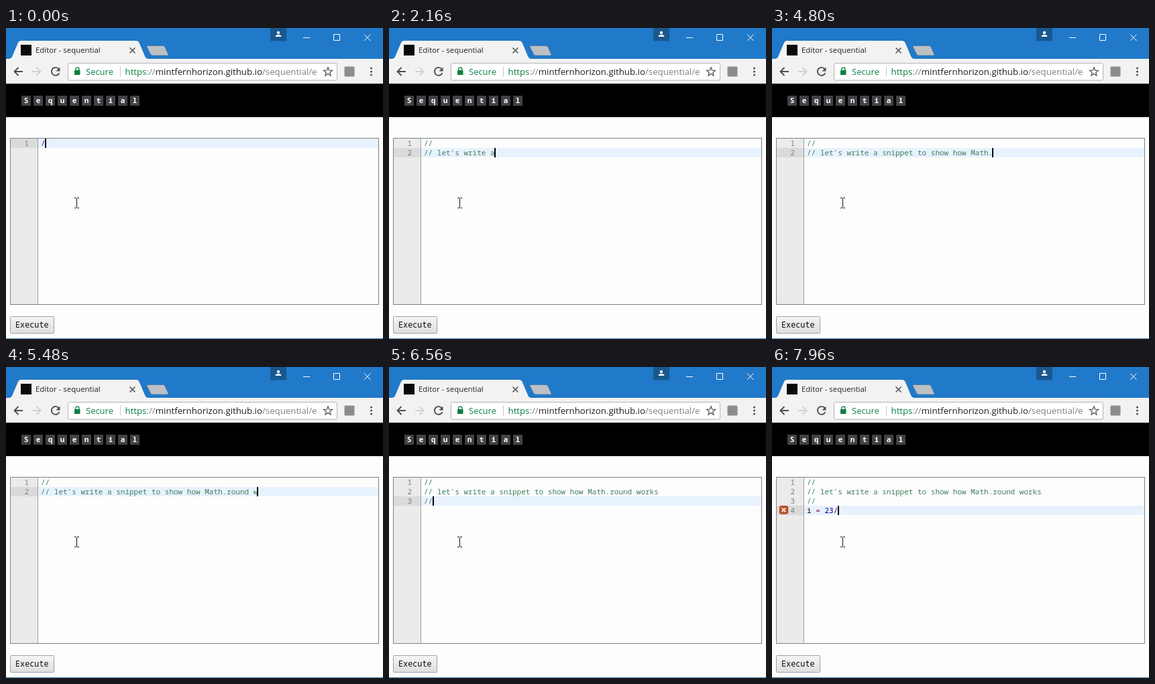
An HTML page that plays this animation: 562 px wide and 464 px high, repeating every 8000 ms.

```html
<!DOCTYPE html>
<html lang="en">
<head>
<meta charset="utf-8">
<title>Editor - sequential</title>
<style>
  html, body { margin: 0; width: 100%; height: 100%; overflow: hidden; background: #fdfdfd; }
  svg { display: block; width: 562px; height: 464px; }
  text { white-space: pre; }
  .ui { font-family: "Open Sans", "Noto Sans", sans-serif; }
  .mono { font-family: "Noto Sans Mono", "DejaVu Sans Mono", monospace; }
  .code { font-size: 11px; }
  .num { text-anchor: end; fill: #7c7c7c; }
  .comment { fill: #3f7f5f; }
  .operator { fill: #7f0055; }
  .regexp { fill: #2a00ff; }
  .number { fill: #00008b; }
  .plain { fill: #000; }
</style>
</head>
<body>
<svg viewBox="0 0 562 464">
  <defs>
    <linearGradient id="face" x2="0" y2="1">
      <stop stop-color="#f5f5f5"/><stop offset="1" stop-color="#dedede"/>
    </linearGradient>
  </defs>
  <rect width="562" height="464" fill="#fdfdfd"/>

  <!-- window frame and tab -->
  <rect width="562" height="46" fill="#2179c9"/>
  <path d="M211 26.500h23q2 0 3 2l5 11q.5 1.500-1.500 1.500h-22q-2 0-3-2l-5.500-11q-.5-1.500 1-1.500z" fill="#bcc0c4" stroke="#3f719f" stroke-width=".7"/>
  <path d="M4 46q4 0 5.500-4l8-19q1.500-4 5-4h171q4 0 5.500 4l8 19q1.500 4 5.500 4z" fill="#f2f2f2"/>
  <rect y="46" width="562" height="37" fill="#f2f2f2"/>
  <rect x="22" y="25" width="16" height="16" fill="#0a0a0a"/>
  <text class="ui" x="44" y="37" font-size="11.4" fill="#222">Editor - sequential</text>
  <path d="M184.500 29.500l8 8m0-8l-8 8" stroke="#555" stroke-width="1.600"/>
  <rect x="394" width="24" height="19.500" fill="#19588f"/>
  <circle cx="406" cy="7" r="2.200" fill="#fff"/>
  <path d="M401.500 13q0-3 4.500-3t4.500 3z" fill="#fff"/>
  <path d="M443 14.500h10M488.500 9.500h9v9h-9zM534 9.500l9.500 9.500m0-9.500l-9.500 9.500" fill="none" stroke="#fff"/>

  <!-- toolbar -->
  <g fill="none" stroke="#4d4d4d" stroke-width="1.900">
    <path d="M25 65H12.500m6-6l-6 6 6 6"/>
    <path d="M39 65h12.500m-6-6l6 6-6 6" stroke="#d2d2d2"/>
    <path d="M78.500 61a6 6 0 1 0 1 6"/>
  </g>
  <path d="M80.500 58.500v6h-6z" fill="#4d4d4d"/>
  <rect x="92.500" y="52.500" width="401" height="25.500" rx="2" fill="#fff" stroke="#b4b4b4"/>
  <rect x="102" y="63" width="8.500" height="7" rx=".7" fill="#0b8043"/>
  <path d="M103.700 63.500v-2a2.600 2.600 0 0 1 5.200 0v2" fill="none" stroke="#0b8043" stroke-width="1.400"/>
  <text class="ui" x="119" y="70" font-size="13" fill="#0b8043">Secure</text>
  <path d="M170.500 57.500v15" stroke="#c8c8c8"/>
  <text class="ui" x="177.500" y="70" font-size="13.25" fill="#808080"><tspan fill="#0b8043">https</tspan>://<tspan fill="#1c1c1c">mintfernhorizon.github.io</tspan>/sequential/e</text>
  <path id="star" fill="none" stroke="#5a5a5a" stroke-width="1.300"/>
  <rect x="504.500" y="57.500" width="15" height="15" rx="1.500" fill="#8c8c8c"/>
  <g fill="#4d4d4d">
    <circle cx="544.500" cy="60" r="1.500"/><circle cx="544.500" cy="65" r="1.500"/><circle cx="544.500" cy="70" r="1.500"/>
  </g>

  <!-- page -->
  <rect y="83" width="562" height="50" fill="#000"/>
  <g id="heading" class="mono" font-size="11" font-weight="700" text-anchor="middle" fill="#fff"></g>

  <rect x="7" y="165" width="40" height="248" fill="#ebebeb"/>
  <g id="activeLine">
    <rect x="7" y="165" width="40" height="14" fill="#dadada"/>
    <rect x="48" y="165" width="507" height="14" fill="#e8f2fe"/>
  </g>
  <path d="M47.500 165v248" stroke="#9f9f9f"/>
  <g id="error">
    <rect x="11.500" y="207.500" width="12" height="11.500" rx="2" fill="#cf4f28" stroke="#943a20"/>
    <path d="M14.700 210.500l5.600 5.600m0-5.600l-5.600 5.600" stroke="#fff" stroke-width="1.600"/>
  </g>
  <g id="code" class="mono code"></g>
  <rect id="caret" width="2" height="14" fill="#000"/>
  <rect x="6.500" y="164.500" width="549" height="248" fill="none" stroke="#808080"/>

  <rect x="6.500" y="430.500" width="65" height="25" rx="1" fill="url(#face)" stroke="#a0a0a0"/>
  <text class="mono" x="14" y="447" font-size="11.8" fill="#111">Execute</text>
  <path d="M102 253.500h2.500l1 1 1-1h2.500M105.500 254.500v13M102 268.500h2.500l1-1 1 1h2.500" fill="none" stroke="#111"/>
  <path d="M0 463.500h562" stroke="#3f79a8"/>
</svg>
<script>
const DURATION = 8000, LINE = 14, COLUMN = 6.58, LEFT = 52, TOP = 165;
const SCRIPT = "//\n// let's write a snippet to show how Math.round works\n//\ni = 23/";
// [time in ms, characters typed]
const PACE = [[0, 1], [2160, 19], [3840, 40], [4800, 45], [5480, 52], [6560, 59], [7960, 67], [8000, 67]];
const ERROR_AT = 7500;
const byId = id => document.getElementById(id);

function add(parent, tag, attrs, content = "") {
  const node = document.createElementNS("http://www.w3.org/2000/svg", tag);
  for (const key in attrs) node.setAttribute(key, attrs[key]);
  node.textContent = content;
  return parent.appendChild(node);
}

[..."Sequential"].forEach((letter, i) => {
  add(byId("heading"), "rect", { x: 23 + i * 18, y: 101, width: 14, height: 15, fill: "#424246" });
  add(byId("heading"), "text", { x: 30 + i * 18, y: 112 }, letter);
});

const starPoints = Array.from({ length: 10 }, (_, i) => {
  const radius = i % 2 ? 2.9 : 6.8, angle = (i / 5 - 0.5) * Math.PI;
  return `${480 + radius * Math.cos(angle)} ${65.5 + radius * Math.sin(angle)}`;
});
byId("star").setAttribute("d", `M${starPoints.join("L")}Z`);

function typedCount(time) {
  const i = PACE.findIndex(([end]) => time < end);
  const [[t0, n0], [t1, n1]] = [PACE[i - 1], PACE[i]];
  return Math.floor(n0 + (n1 - n0) * (time - t0) / (t1 - t0) + 0.001);
}

function tokenClass(token, line) {
  if (token.startsWith("//")) return "comment";
  if (line === "/") return "regexp";
  if (/^\d/.test(token)) return "number";
  return /^[=/]/.test(token) ? "operator" : "plain";
}

let shown = -1;
function drawCode(count) {
  if (count === shown) return;
  shown = count;
  const lines = SCRIPT.slice(0, count).split("\n");
  const code = byId("code"), last = lines.length - 1;
  code.replaceChildren();
  lines.forEach((line, row) => {
    const y = TOP + 11 + row * LINE;
    add(code, "text", { class: "num", x: 34, y }, row + 1);
    const text = add(code, "text", { x: LEFT, y });
    for (const token of line.match(/\/\/.*|\d+|\s+|\w+|./g) || [])
      add(text, "tspan", { class: tokenClass(token, line) }, token);
  });
  byId("activeLine").setAttribute("transform", `translate(0 ${last * LINE})`);
  byId("caret").setAttribute("x", Math.round(LEFT + lines[last].length * COLUMN - 0.5));
  byId("caret").setAttribute("y", TOP + last * LINE);
}

function render(now) {
  const time = now % DURATION;
  drawCode(typedCount(time));
  byId("error").style.display = time >= ERROR_AT ? "" : "none";
}

const start = performance.now();
function tick() {
  render(performance.now() - start);
  requestAnimationFrame(tick);
}
tick();
</script>
</body>
</html>
```
